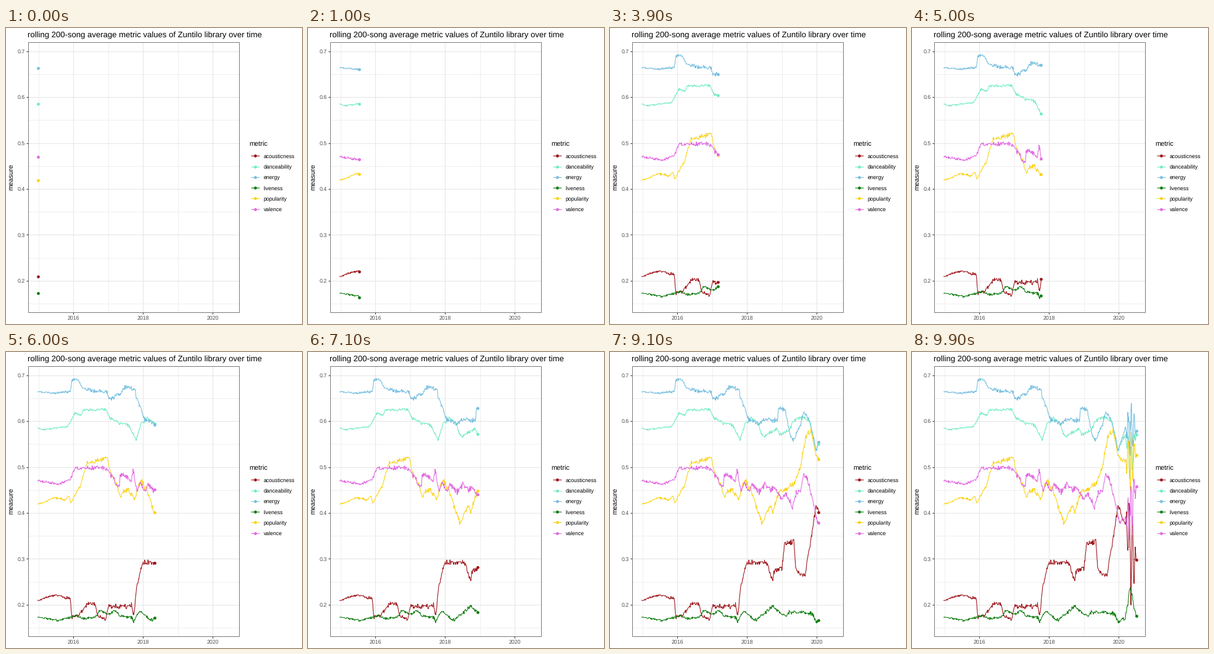
These frames come from a looping animation (480 px wide and 480 px high, 10000 ms). A matplotlib script:

```python
import numpy as np
import matplotlib.pyplot as plt
from matplotlib.animation import FuncAnimation

plt.rcParams["font.family"] = "Liberation Sans"
plt.rcParams["text.hinting"] = "none"
plt.rcParams["path.simplify"] = False

SIZE, DPI = 480, 72
FRAMES, INTERVAL = 100, 100
LEFT, RIGHT, TOP, BOTTOM = 36, 378, 23, 461
START, END = 51.0, 363.5
BURST = 346  # x where the last, very restless stretch begins

# name, colour, jitter, size of the final swings, main turning points (x, y)
METRICS = [
    ("acousticness", "#9e141a", 1.2, 75, [
        (51, 403), (78, 394), (104, 400), (107, 430), (116, 428), (133, 408),
        (145, 410), (149, 429), (162, 434), (167, 413), (204, 411), (207, 428),
        (212, 383), (221, 342), (253, 342), (264, 369), (267, 355), (279, 350),
        (283, 314), (298, 305), (301, 350), (308, 362), (316, 361), (326, 305),
        (334, 250), (346, 280), (363.5, 337)]),
    ("danceability", "#70ecc2", 0.7, 22, [
        (51, 123), (61, 126), (100, 120.5), (112, 99), (122, 103), (125, 94),
        (162, 93), (168, 106), (184, 116), (199, 118), (211, 142), (219, 117),
        (229, 107), (241, 117), (247, 138), (270, 125), (275, 134), (292, 126),
        (296, 112), (314, 106), (325, 113), (334, 160), (346, 133), (354, 180),
        (363.5, 134)]),
    ("energy", "#76bfe0", 1.0, 38, [
        (51, 64.5), (80, 67), (104, 64), (107, 45), (116, 45), (124, 58),
        (146, 64), (163, 63), (168, 77), (185, 68), (192, 57), (209, 60),
        (212, 76), (225, 109), (241, 118), (252, 109), (272, 111), (273, 90),
        (284, 93), (293, 140), (299, 141), (309, 116), (315, 96), (324, 112),
        (334, 159), (346, 124), (363.5, 128)]),
    ("liveness", "#0f7d0f", 0.8, 5, [
        (51, 430), (86, 435.5), (116, 427), (124, 432), (145, 431), (152, 419),
        (168, 425), (176, 419), (186, 428), (204, 430), (207, 438), (217, 419),
        (235, 436), (264, 413), (285, 430), (290, 422), (328, 424), (335, 439),
        (346, 430), (354, 382), (363.5, 428)]),
    ("popularity", "#fcd316", 1.2, 45, [
        (51, 247), (80, 236), (95, 240), (102, 234), (105, 244), (121, 215),
        (131, 180), (149, 176), (164, 172), (168, 190), (186, 233), (197, 221),
        (209, 238), (219, 207), (230, 229), (246, 278), (259, 250), (264, 261),
        (273, 228), (288, 222), (302, 208), (309, 186), (317, 138), (326, 125),
        (334, 168), (346, 178), (363.5, 167)]),
    ("valence", "#e26ae2", 1.2, 42, [
        (51, 209), (84, 214), (104, 207), (112, 188), (163, 188), (184, 222),
        (185, 198), (204, 207), (206, 191), (213, 227), (218, 212), (224, 225),
        (231, 214), (242, 228), (251, 214), (260, 224), (266, 217), (278, 240),
        (287, 231), (296, 252), (302, 229), (309, 226), (314, 195), (323, 213),
        (336, 275), (353, 262), (363.5, 218)]),
]

rng = np.random.default_rng(7)
xs = np.arange(START, END + 0.01, 0.5)


def rolling(points, jitter, swing):
    """Curve through the points with held random jumps and a final burst."""
    px, py = np.array(points).T
    growth = np.interp(xs, [START, 104, 200], [0.7, 1.1, 2.0])
    jump = np.where(rng.random(xs.size) < 0.6, np.arange(xs.size), 0)
    held = rng.normal(0, 1, xs.size)[np.maximum.accumulate(jump)]
    noise = np.clip(held, -2, 2) * jitter * growth
    t = np.clip((xs - BURST) / (END - BURST), 0, 1)
    burst = swing * np.sin(np.pi * t) * np.sin(2 * np.pi * (3.5 * t + rng.random()))
    burst += 0.3 * swing * np.sin(np.pi * t) * rng.normal(0, 1, xs.size)
    noise[:3] = noise[-1] = 0
    return np.interp(xs, px, py) + noise + burst


fig = plt.figure(figsize=(SIZE / DPI, SIZE / DPI), dpi=DPI, facecolor="white")
ax = fig.add_axes([0, 0, 1, 1])
ax.set_xlim(0, SIZE)
ax.set_ylim(SIZE, 0)
ax.axis("off")


def segment(x, y, color, width=1.07, **kw):
    return ax.plot(x, y, color=color, lw=width, solid_capstyle="butt", **kw)[0]


def dot(x, y, color):
    return ax.plot([x], [y], "o", color=color, ms=4.8, mew=0, zorder=4)[0]


def label(x, y, text, size=8.8, color="black", **kw):
    ax.text(x, y, text, fontsize=size, color=color, **kw)


def year_x(year):
    return 109 + (year - 2016) * 56.5


def value_y(value):
    return 37.8 + (0.7 - value) * 744


# Grid, minor lines first
for year in (2015, 2017, 2019):
    segment([year_x(year)] * 2, [TOP, BOTTOM], "#efefef", 1, zorder=1)
for value in np.arange(0.15, 0.7, 0.1):
    segment([LEFT, RIGHT], [value_y(value)] * 2, "#efefef", 1, zorder=1)
for year in (2016, 2018, 2020):
    x = year_x(year)
    segment([x, x], [TOP, BOTTOM], "#e6e6e6", zorder=1.5)
    segment([x, x], [BOTTOM, BOTTOM + 3], "#333333")
    label(x, 473, str(year), color="#4d4d4d", ha="center")
for value in np.arange(0.2, 0.75, 0.1):
    y = value_y(value)
    segment([LEFT, RIGHT], [y, y], "#e6e6e6", zorder=1.5)
    segment([LEFT - 3, LEFT], [y, y], "#333333")
    label(30.5, y + 3.2, f"{value:.1f}", color="#4d4d4d", ha="right")
ax.add_patch(plt.Rectangle((LEFT, TOP), RIGHT - LEFT, BOTTOM - TOP,
                           fill=False, ec="#7a7a7a", lw=1, zorder=5))

label(35.4, 15.1,
      "rolling 200-song average metric values of Zuntilo library over time", 13.15)
label(9.7, 242, "measure", 11, rotation=90, ha="center", va="center")

# Legend
label(394.6, 192, "metric", 11)
for i, (name, color, *_) in enumerate(METRICS):
    y = 207.3 + 17.28 * i
    segment([396.7, 410.5], [y, y], color)
    dot(403.6, y, color)
    label(417.6, y + 3.3, name)

curves = []
for _, color, jitter, swing, points in METRICS:
    ys = rolling(points, jitter, swing)
    line = segment([], [], color, zorder=3)
    curves.append((ys, line, dot(START, ys[0], color)))


def draw(i):
    head = 52 + (END - 52) * i / (FRAMES - 1)
    n = np.searchsorted(xs, head)
    for ys, line, tip in curves:
        y = np.interp(head, xs, ys)
        line.set_data(np.append(xs[:n], head), np.append(ys[:n], y))
        tip.set_data([head], [y])
    return [artist for _, line, tip in curves for artist in (line, tip)]


anim = FuncAnimation(fig, draw, frames=FRAMES, interval=INTERVAL,
                     init_func=lambda: draw(0), repeat=True, repeat_delay=0)
plt.show()
```
